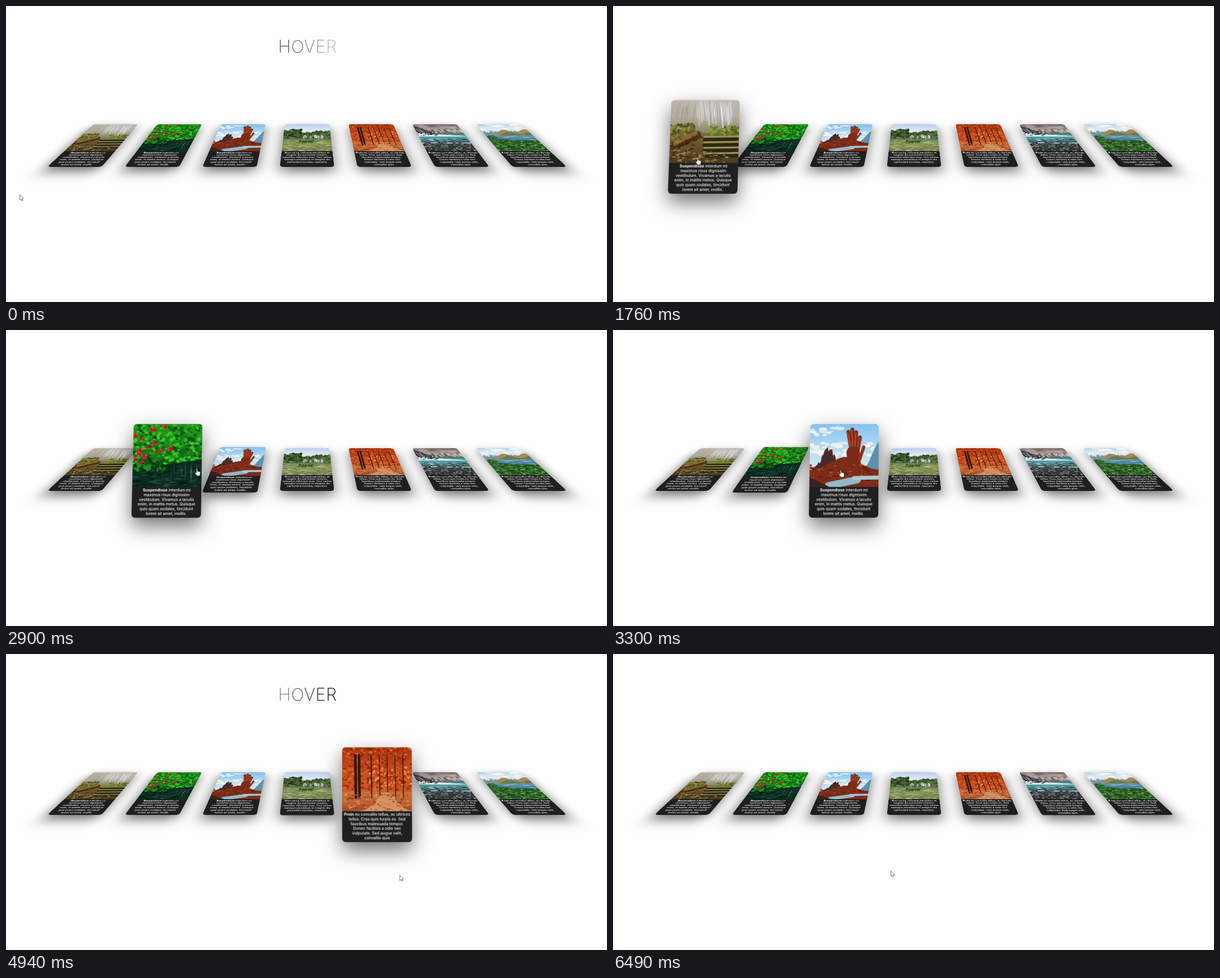
Write an HTML page with a canvas that moves like this. It is 1065 by 526 pixels and loops after 7.27 s.

```html
<!DOCTYPE html>
<html lang="en">
<head>
<meta charset="utf-8">
<title>Hover cards</title>
<style>
html, body { margin: 0; width: 100%; height: 100%; overflow: hidden; background: #fefefe; }
#stage { position: relative; width: 1065px; height: 526px; overflow: hidden; }
.card {
  position: absolute; left: -62px; top: -84.5px; width: 124px; height: 169px;
  border-radius: 6px; box-shadow: 0 15px 35px rgba(0, 0, 0, .55);
}
#title {
  position: absolute; top: 52px; left: 0; width: 1069px; text-align: center;
  font: 200 30.5px/40px Inter, "Open Sans", sans-serif; letter-spacing: .6px; color: #111;
}
#pointer { position: absolute; left: 0; top: 0; z-index: 200; overflow: visible; }
</style>
</head>
<body>
<div id="stage">
  <div id="title"></div>
  <svg id="pointer" width="14" height="18">
    <path id="arrow" d="M.5 .5V10L2.7 8L4.2 11.2L5.8 10.5L4.4 7.4H7Z" fill="#fff" stroke="#555" stroke-width=".8"/>
    <path id="hand" d="M2.8 8V1.6Q3.6 .2 4.5 1.6V5.2L9 6.2Q9.8 6.6 9.6 8L8.8 13.4H3.8L.6 9Q.4 7.4 1.6 7.6Z" fill="#fff" stroke="#333" stroke-width=".7"/>
  </svg>
</div>
<script>
const LOOP = 7270, W = 124, H = 169, PIC = 114, DENSITY = 2;
const stage = document.getElementById('stage');
let g, seed;

const clamp = v => Math.min(1, Math.max(0, v));
const mix = (a, b, k) => a + (b - a) * k;
const bump = (x, center, width) => Math.exp(-(((x - center) / width) ** 2));
const rnd = (a = 0, b = 1) => {
  seed = (seed * 16807) % 2147483647;
  return mix(a, b, seed / 2147483647);
};

// Vertical gradient band
function fade(y0, y1, ...colors) {
  const f = g.createLinearGradient(0, y0, 0, y1);
  colors.forEach((c, i) => f.addColorStop(i / (colors.length - 1), c));
  g.fillStyle = f;
  g.fillRect(0, y0, W, y1 - y0);
}

// Ground below the curve top(x), down to base
function land(color, base, top) {
  g.fillStyle = color;
  g.beginPath();
  g.moveTo(0, base);
  for (let x = 0; x <= W; x += 2) g.lineTo(x, Math.min(base, top(x)));
  g.lineTo(W, base);
  g.fill();
}

function bar(color, width, x0, y0, x1, y1) {
  g.strokeStyle = color;
  g.lineWidth = width;
  g.beginPath();
  g.moveTo(x0, y0);
  g.lineTo(x1, y1);
  g.stroke();
}

function spots(colors, n, x, y, w, h, r, flat = 1) {
  for (let i = 0; i < n; i++) {
    const size = rnd(r * .4, r);
    g.fillStyle = colors[i % colors.length];
    g.beginPath();
    g.ellipse(x + rnd(0, w), y + rnd(0, h), size, size * flat, 0, 0, 7);
    g.fill();
  }
}

function streaks(color, n, x, y, w, h, slant = 0) {
  for (let i = 0; i < n; i++) {
    const sx = x + rnd(0, w), sy = y + rnd(0, h * .3);
    bar(color, rnd(.4, 1.8), sx, sy, sx + slant, sy + rnd(h * .4, h * .7));
  }
}

const pictures = [
  function falls() {
    fade(0, 60, '#c2bab0', '#b5afa4', '#8a8560');
    fade(60, PIC, '#75703a', '#65502a', '#4a3b1f');
    streaks('rgba(226,236,250,.6)', 44, 44, 0, 66, 58, 4);
    streaks('rgba(150,138,118,.4)', 18, 2, 0, 44, 50, -3);
    spots(['#6a6b2c', '#8b8539', '#4d5020'], 80, 0, 44, 44, 26, 4);
    spots(['#687b2c', '#8b9a3d', '#52601e'], 60, 72, 48, 52, 20, 4);
    bar('#4a3218', 16, 8, 84, 48, 64);
    bar('#8d6635', 8, 10, 78, 46, 60);
    spots(['#34230f', '#a07c45', '#62431f'], 60, 0, 66, 60, 38, 3, .5);
    for (let y = 66; y < 104; y += 10) {
      bar('#2a2812', 6, 62, y + 6, W, y + 5);
      bar('#a59a62', 2.5, 62, y + 1, W, y);
    }
    spots(['#9c7f4d', '#3e3317', '#705d31'], 80, 0, 94, W, 20, 4, .5);
  },
  function blossoms() {
    fade(0, PIC, '#23981a', '#15771a', '#0a3d1c');
    spots(['#1d9d18', '#2cc01a', '#0f6815', '#0a4b12', '#45c72e'], 400, 0, 0, W, 74, 4, .8);
    land('#092b20', PIC, x => 82 - x * .14);
    spots(['#12382a', '#06190f', '#1b4a3a'], 90, 0, 76, W, 38, 8, .2);
    spots(['#073b12', '#0d5a18', '#218d24'], 70, 0, 64, 58, 20, 4);
    streaks('rgba(125,160,150,.25)', 18, 52, 72, 70, 36);
    for (let i = 0; i < 20; i++) {
      spots(['#d51b28', '#e8473f', '#b90e22'], 7, rnd(0, 66), rnd(2, 68), 6, 5, 2.3);
    }
  },
  function redRock() {
    fade(0, 86, '#86c1ef', '#b4dbf4', '#e0e9e6');
    spots(['#f4f5f0', '#e9f0ee'], 45, 0, 34, W, 24, 9, .45);
    spots(['#eef4f4', '#d6e9f4'], 14, 0, 5, 60, 16, 8, .4);
    land('#5f90b0', 92, x => 92 - 62 * bump(x, 128, 22));
    land('#4b2a2b', 82, x => 82 - (22 + rnd(0, 20)) * bump(x, 34, 18));
    land('#7d2b18', PIC, x => 84 - 24 * bump(x, 64, 34));
    for (let i = 0; i < 4; i++) {
      const tip = 69 + i * 7, top = 20 - 10 * Math.sin(i + .6);
      bar('#7d2b18', 7, 76 + i * 3, 54, tip, top);
      bar('#b34825', 2.5, 75 + i * 3, 52, tip - 1, top + 2);
    }
    bar('#7d2b18', 24, 78, 52, 80, 72);
    bar('#8d341c', 6, 90, 64, 97, 42);
    spots(['#5d2117', '#a7472a', '#823019'], 90, 0, 74, 106, 28, 4, .5);
    bar('#93b7cb', 13, 34, 112, 86, 101);
    bar('#a9c8d6', 7, 80, 98, W, 97);
    land('#39231f', PIC, x => 96 + x * .5);
  },
  function lake() {
    fade(0, 64, '#bfd0ee', '#e0e9f3', '#d3ddd5');
    fade(64, PIC, '#75865a', '#8f9a5e', '#6b764a');
    land('#57704a', 68, x => 34 + rnd(0, 8) - 8 * bump(x, 20, 26));
    spots(['#324b28', '#4c6a36', '#66804a', '#293d22'], 260, 0, 36, W, 26, 4.5);
    spots(['#344d27', '#4d6935', '#233619'], 70, 0, 24, 46, 36, 5);
    spots(['#3b552c', '#5b7740'], 50, 82, 30, 42, 30, 5);
    spots(['#77756a', '#5d6247'], 24, 46, 54, 70, 10, 4);
    streaks('rgba(240,245,248,.75)', 24, 50, 48, 54, 20);
    spots(['#a6b174', '#627641', '#b0b98a', '#75894d'], 120, 0, 70, W, 44, 9, .18);
    spots(['#46602d', '#5d7938', '#344a21'], 42, 38, 72, 42, 10, 4, .7);
  },
  function autumn() {
    fade(0, 80, '#a93412', '#c4491a', '#c95f2c');
    fade(80, PIC, '#cb713f', '#bd6336', '#a04820');
    spots(['#a92e0d', '#cf4f1b', '#dd6a28', '#842a10', '#bb3b14'], 520, 0, 0, W, 76, 3.4, .7);
    spots(['#f0a263', '#ef8a3f'], 60, 48, 34, 76, 36, 2.2);
    for (let i = 0; i < 7; i++) {
      const x = 24 + i * 14 - 8 * bump(i, 1, .6);
      bar('#32160e', 1.5 + 4 * bump(i, .5, 1), x, 14, x + 1, 90);
    }
    land('#d39367', PIC, x => PIC - 34 * bump(x, 78, 24));
    spots(['#b9501c', '#d87a39', '#e1a06c', '#8e3c16'], 170, 0, 84, W, 30, 3, .4);
  },
  function alpine() {
    fade(0, 44, '#80706e', '#a99791', '#c9bfb9');
    spots(['rgba(80,72,72,.25)', 'rgba(210,198,190,.25)'], 30, 0, 0, W, 20, 14, .3);
    land('#696361', 48, x => 26 + 5 * Math.sin(x * .37) + rnd(0, 4));
    streaks('rgba(238,238,240,.6)', 45, 50, 26, 74, 18, 4);
    land('#37363a', 50, x => 6 + x * .62 + rnd(0, 3));
    streaks('rgba(235,236,240,.5)', 18, 0, 14, 38, 32, 7);
    fade(44, 82, '#3f8c96', '#5b979d', '#3c5a60');
    land('#e4eaec', 56, x => 41 + x * .1);
    spots(['#222a2c', '#dfe6e8', '#5c6163'], 50, 0, 38, 54, 14, 3.5, .6);
    fade(56, 66, '#4a9ba3', '#5ba3a9');
    spots(['rgba(190,214,216,.5)', 'rgba(52,58,62,.6)', 'rgba(40,104,112,.6)'], 80, 0, 64, W, 20, 8, .25);
    fade(84, PIC, '#41494c', '#34393b', '#25282a');
    spots(['#596467', '#1c2225', '#7b8688', '#30383b', '#857d77'], 260, 0, 80, W, 34, 3.5, .5);
  },
  function bay() {
    fade(0, 52, '#b7d4eb', '#e3edf2', '#b9cdd5');
    spots(['#f3f4f3', '#d9e7ef'], 26, 0, 2, W, 24, 14, .4);
    land('#78949d', 54, () => rnd(28, 40));
    land('#a48a55', 54, x => 54 - 28 * bump(x, 60, 26) - 30 * bump(x, 118, 26));
    land('#697a55', 55, x => 55 - 19 * bump(x, 68, 26) - 18 * bump(x, 124, 22));
    fade(52, 82, '#6197b2', '#477f9e', '#3d7373');
    spots(['rgba(183,214,222,.5)'], 18, 10, 53, 105, 17, 11, .15);
    land('#2b5f29', PIC, x => 62 + x * .13);
    spots(['#296326', '#468b35', '#18401c', '#61a043', '#1c4a20'], 260, 0, 72, W, 42, 4, .7);
    spots(['#295f31', '#3e7d3b'], 35, 0, 54, 24, 28, 5);
    spots(['#d97c6a', '#c85044'], 15, 8, 78, 112, 32, 1.8);
  }
];

const suspend = ['Suspendisse interdum mi', 'maximus risus dignissim', 'vestibulum. Vivamus a iaculis',
  'enim, in mattis metus. Quisque', 'quis quam sodales, tincidunt', 'lorem sit amet, mollis.'];
const orci = ['Orci varius natoque penatibus et', 'magnis dis parturient montes,',
  'nascetur ridiculus mus. Orci varius', 'natoque penatibus et magnis dis', 'parturient montes, nascetur'];
const proin = ['Proin eu convallis tellus, ac ultrices', 'tellus. Cras quis turpis ex. Sed',
  'faucibus malesuada tempor.', 'Donec facilisis a odio nec', 'vulputate. Sed augue velit,', 'convallis quis'];
const texts = [suspend, suspend, suspend, orci, proin, proin, proin];

function caption(lines) {
  const face = weight => `${weight} 7px Inter, "Open Sans", sans-serif`;
  g.fillStyle = '#fff';
  lines.forEach((line, i) => {
    const cut = i ? 0 : line.indexOf(' ');
    const parts = [[line.slice(0, cut), 700], [line.slice(cut), 500]];
    const widths = parts.map(([s, weight]) => {
      g.font = face(weight);
      return g.measureText(s).width;
    });
    let x = (W - widths[0] - widths[1]) / 2;
    parts.forEach(([s, weight], k) => {
      g.font = face(weight);
      g.fillText(s, x, 122 + i * 8.4);
      x += widths[k];
    });
  });
}

const cards = pictures.map((paint, i) => {
  const c = document.createElement('canvas');
  c.className = 'card';
  c.width = W * DENSITY;
  c.height = H * DENSITY;
  g = c.getContext('2d');
  g.scale(DENSITY, DENSITY);
  g.lineCap = 'round';
  seed = 977 + i * 131;
  paint();
  g.fillStyle = '#1f1f1f';
  g.fillRect(0, PIC, W, H - PIC);
  caption(texts[i]);
  stage.append(c);
  return c;
});

const letters = [...'HOVER'].map(ch => {
  const s = document.createElement('span');
  s.textContent = ch;
  document.getElementById('title').append(s);
  return s;
});

// cubic-bezier(.25, .1, .25, 1)
function ease(x) {
  if (x <= 0 || x >= 1) return clamp(x);
  let lo = 0, hi = 1, u;
  for (let i = 0; i < 18; i++) {
    u = (lo + hi) / 2;
    if (.75 * u * (1 - u) + u ** 3 < x) lo = u; else hi = u;
  }
  return .3 * u * (1 - u) ** 2 + 3 * u * u * (1 - u) + u ** 3;
}

// Times (ms) the pointer crosses onto each card, the last one off the row
const crossings = [1322, 2260, 2865, 3625, 4420, 5050, 5965];
const [firstIn, lastOut] = [crossings[0], crossings[crossings.length - 1]];

function lift(i, t) {
  if (i + 1 >= crossings.length) return 0;
  return ease((t - crossings[i]) / 600) * (1 - ease((t - crossings[i + 1]) / 600));
}

function poseCard(card, i, t) {
  const k = lift(i, t);
  card.style.transform = 'translate(533.5px,249.5px) perspective(465px) ' +
    `translate3d(${(i - 3) * W}px,${mix(-5.7, 0, k)}px,0) rotateX(${mix(50, 0, k)}deg) scale(${mix(.7, 1, k)})`;
  card.style.zIndex = 1 + Math.round(k * 100);
}

// Every 4 s: fade in 1 s, hold, fade out .7 s; letters follow 100 ms apart
function letterAlpha(i, t) {
  const p = (t + 4700 - i * 100) % 4000;
  return Math.min(clamp(p / 1000), clamp((2000 - p) / 700));
}

// Pointer stops: time, x, y
const stops = [
  [800, 24, 335], [1360, 120, 276], [1910, 156, 266], [2440, 259, 243], [3300, 400, 248],
  [4150, 511, 250], [4930, 694, 399], [5100, 745, 300], [5710, 786, 277], [6450, 492, 385]
];

function pointerAt(t) {
  const n = stops.findIndex(s => s[0] > t);
  const b = stops[n < 0 ? stops.length - 1 : n];
  const a = n > 0 ? stops[n - 1] : b;
  const k = a === b ? 0 : (t - a[0]) / (b[0] - a[0]);
  return [mix(a[1], b[1], k), mix(a[2], b[2], k)];
}

const pointer = document.getElementById('pointer');
const arrow = document.getElementById('arrow');
const hand = document.getElementById('hand');

function draw(t) {
  cards.forEach((c, i) => poseCard(c, i, t));
  letters.forEach((s, i) => { s.style.opacity = letterAlpha(i, t); });
  const [x, y] = pointerAt(t);
  const over = t >= firstIn && t < lastOut && y < 334;
  pointer.style.transform = `translate(${x}px,${y}px)`;
  arrow.style.display = over ? 'none' : '';
  hand.style.display = over ? '' : 'none';
}

const start = performance.now();
function tick() {
  draw((performance.now() - start) % LOOP);
  requestAnimationFrame(tick);
}
tick();
</script>
</body>
</html>
```
